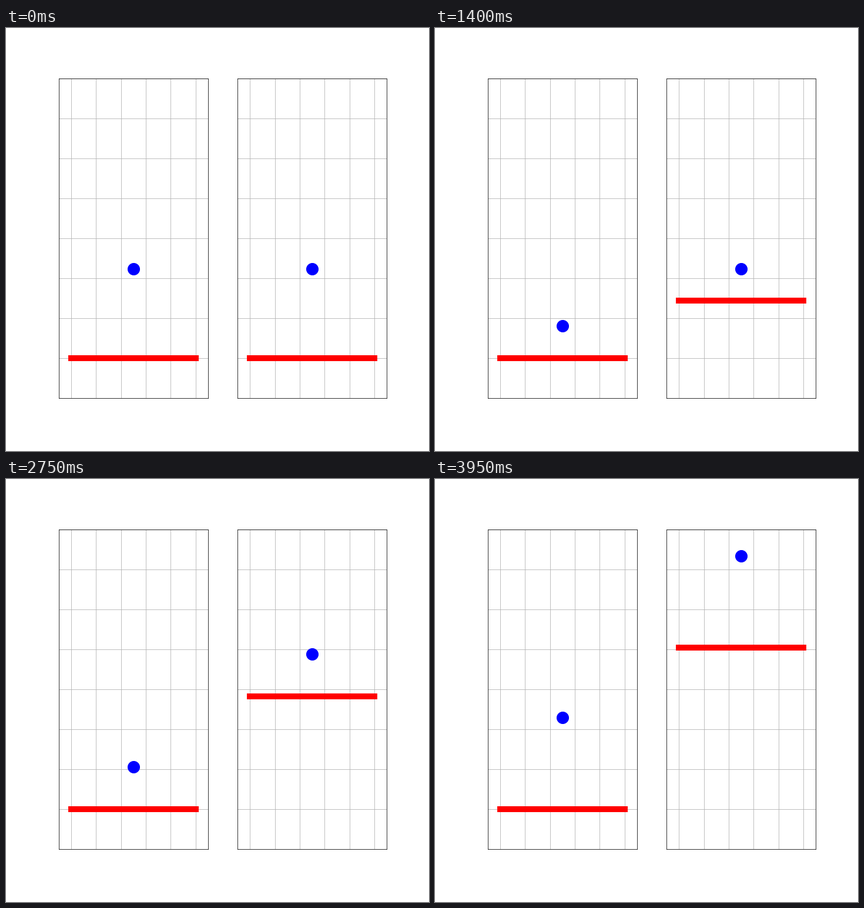
These frames come from a looping animation (720 px wide and 720 px high, 4000 ms). A matplotlib script:

```python
import matplotlib.pyplot as plt
from matplotlib.animation import FuncAnimation

FRAMES = 80
BOUNCE = 39              # step at which ball and floor touch
STEP = 2 / BOUNCE        # relative travel per step
GAP = 0.24               # ball centre above the floor at contact


def make_panel(ax):
    ax.set(xlim=(-0.5, 5.5), ylim=(-1, 7), xticks=range(6), yticks=range(-1, 8))
    ax.tick_params(length=0, labelbottom=False, labelleft=False)
    ax.grid(True)
    floor, = ax.plot([0, 5], [0, 0], color="red", lw=10)
    ball, = ax.plot([2.5], [2 + GAP], "o", color="blue", ms=20)
    return floor, ball


fig, axes = plt.subplots(1, 2, figsize=(10, 10), dpi=72)
# wspace sits just under 0.2 so edge lines snap to the outer pixels
fig.subplots_adjust(left=0.125, right=0.9, bottom=0.125, top=0.88, wspace=0.1999)
(fixed_floor, fixed_ball), (moving_floor, moving_ball) = map(make_panel, axes)


def update(i):
    height = abs(i - BOUNCE) * STEP + GAP
    lift = i * STEP
    fixed_ball.set_ydata([height])
    moving_floor.set_ydata([lift, lift])
    moving_ball.set_ydata([height + lift])
    return fixed_ball, moving_floor, moving_ball


anim = FuncAnimation(fig, update, frames=FRAMES, interval=50, repeat=True, repeat_delay=0)
plt.show()
```
